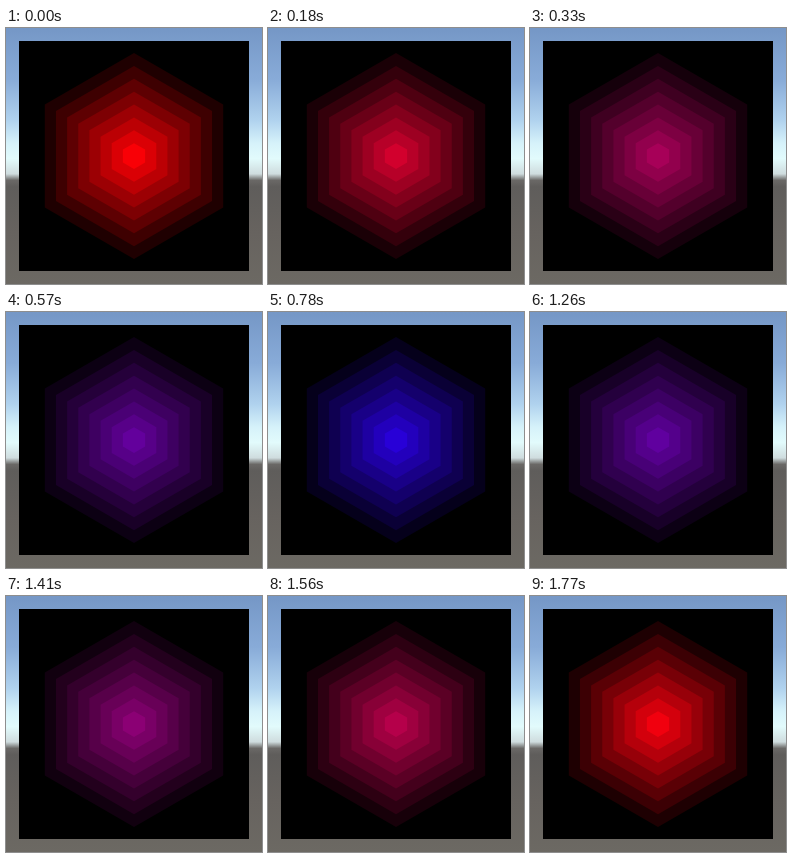
An HTML page with a canvas that plays this animation: 256 by 256 pixels, repeating every 1800 ms.

```html
<!DOCTYPE html>
<html lang="en">
<head>
<meta charset="utf-8">
<title>Glowing hexagon</title>
<style>
html, body { margin: 0; width: 100%; height: 100%; overflow: hidden; background: #000; }
canvas { display: block; width: 100vw; height: 100vh; }
</style>
</head>
<body>
<canvas id="stage" width="256" height="256"></canvas>
<script>
const ctx = document.getElementById('stage').getContext('2d');
const LOOP = 1800, STEP = 30, PEAK = 20;
const LAYERS = 8, RADIUS = 103, CENTER = 128;

const sky = ctx.createLinearGradient(0, 0, 0, 256);
[
  [0, '#7597c6'], [0.2, '#88abd8'], [0.36, '#b0d2ee'], [0.45, '#d6f2fa'], [0.51, '#e2fbfc'],
  [0.57, '#cfdcde'], [0.595, '#6a6866'], [0.62, '#5f5d5b'], [0.8, '#67635f'], [1, '#6c6963']
].forEach(([at, color]) => sky.addColorStop(at, color));

function hexagon(radius) {
  ctx.beginPath();
  for (let i = 0; i < 6; i++) {
    const a = Math.PI / 3 * i - Math.PI / 2;
    ctx.lineTo(CENTER + radius * Math.cos(a), CENTER + radius * Math.sin(a));
  }
  ctx.closePath();
  ctx.fill();
}

// Share of red: 1 at the peak, 0 half a loop later.
function redShare(time) {
  const phase = ((time - PEAK + LOOP) % LOOP) / LOOP;
  return Math.abs(1 - 2 * phase);
}

function draw(time) {
  ctx.fillStyle = sky;
  ctx.fillRect(0, 0, 256, 256);
  ctx.fillStyle = '#000';
  ctx.fillRect(13, 13, 230, 230);

  const red = redShare(time);
  for (let i = 1; i <= LAYERS; i++) {
    const light = 255 * i / LAYERS;
    ctx.fillStyle = `rgb(${Math.round(light * red)}, 0, ${Math.round(light * (1 - red))})`;
    hexagon(RADIUS * (LAYERS + 1 - i) / LAYERS);
  }
}

const start = performance.now();
function tick() {
  const time = (performance.now() - start) % LOOP;
  draw(Math.floor(time / STEP) * STEP);
  requestAnimationFrame(tick);
}
tick();
</script>
</body>
</html>
```
